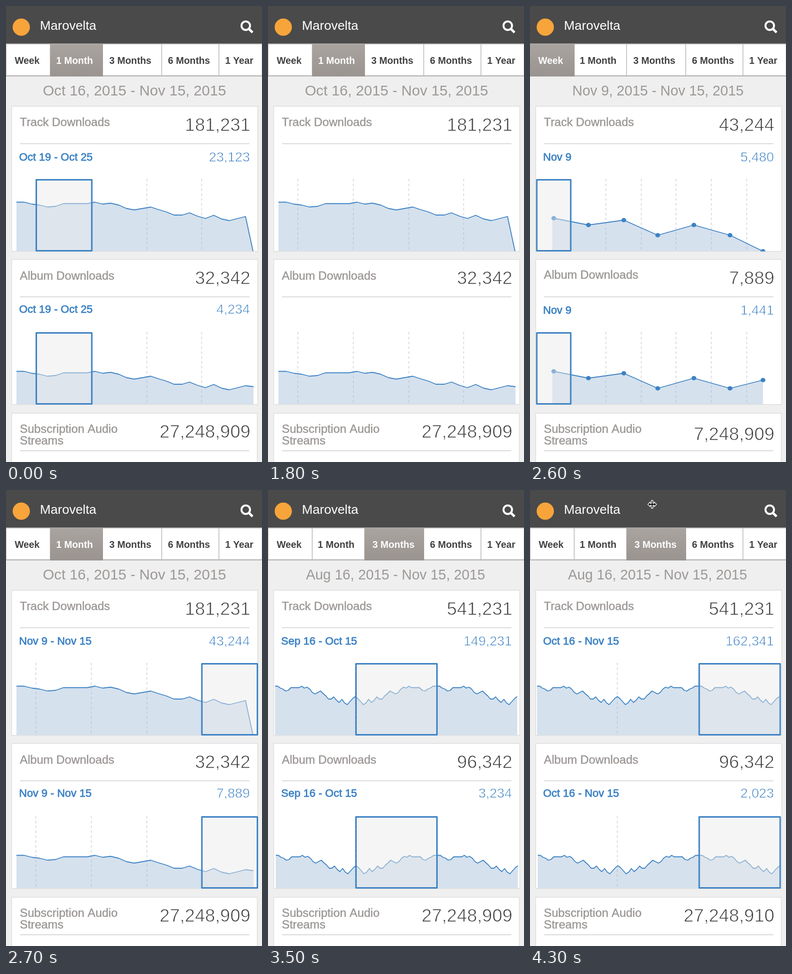
Recreate the animation shown at these times as an HTML page with a canvas. Size 528 px wide and 938 px high, loop 4400 ms.

```html
<!DOCTYPE html>
<html lang="en">
<head>
<meta charset="utf-8">
<title>Download trends</title>
<style>
html, body { margin: 0; width: 100%; height: 100%; overflow: hidden; background: #efefef; }
canvas { display: block; width: 528px; height: 938px; }
</style>
</head>
<body>
<canvas id="stage"></canvas>
<script>
const W = 528, H = 938, LOOP = 4400;
const BLUE = '#3d82c4', GRAY = '#9c9896', DARK = '#3e3e40';
const SANS = '"Liberation Sans", Arial, sans-serif';

const canvas = document.getElementById('stage');
const ctx = canvas.getContext('2d');
const ratio = window.devicePixelRatio || 1;
canvas.width = W * ratio;
canvas.height = H * ratio;

// Tab label, left edge, right edge, text x, text x when active
const TABS = [
  ['Week', 0, 91, 18, 17],
  ['1 Month', 91, 199, 102.5, 103.5],
  ['3 Months', 199, 321, 213, 215.5],
  ['6 Months', 321, 439, 334, 334],
  ['1 Year', 439, 528, 452, 452]
];

const trend = [
  [21, 403], [37, 403], [53, 407], [69, 409], [85, 413], [102, 411.5], [118, 406],
  [167, 406], [183, 403], [199, 407], [215, 405], [232, 409], [248, 416], [264, 419],
  [298, 413], [313, 418], [330, 423], [346, 429.5], [363, 429.5], [378, 425],
  [395, 432], [411, 436.5], [428, 430], [444, 437.5], [460, 441]
];
const shift = (pts, dx, dy) => pts.map(([x, y]) => [x + dx, y + dy]);

// A quarter is the monthly trend squeezed, mirrored and repeated
const third = trend.map(([x, y]) => [14 + (x - 21) * 0.339, y]);
third.push([174.5, 428], [179.5, 424.5]);
const mirror = third.map(([x, y]) => [359 - x, y]).reverse();
const quarter = [...third, ...mirror, ...shift(third, 334, 0)];

const week = [[48.5, 436], [120, 450], [193, 440], [263, 471], [337.5, 450], [412, 471]];

const RANGES = {
  week: {
    tab: 0, dates: 'Nov 9, 2015 - Nov 15, 2015', size: 28.9, mid: 264,
    totals: ['43,244', '7,889'], streams: '7,248,909', streamsY: 893,
    titleY: 561, subY: 633, dots: true, left: 46,
    lines: [84.5, 156.5, 229.5, 301, 374, 447],
    charts: [[...week, [480, 504]], [...shift(week, 0, 315), [480, 769]]]
  },
  month: {
    tab: 1, dates: 'Oct 16, 2015 - Nov 15, 2015', size: 30.1, mid: 265,
    totals: ['181,231', '32,342'], streams: '27,248,909', streamsY: 888,
    titleY: 563, subY: 631,
    lines: [61.5, 176, 290.5, 403.5],
    charts: [
      [...trend, [493.5, 432.5], [509, 504]],
      [...shift(trend, 0, 348), [493.5, 780.5], [510, 782.5]]
    ]
  },
  quarter: {
    tab: 2, dates: 'Aug 16, 2015 - Nov 15, 2015', size: 28.9, mid: 263,
    totals: ['541,231', '96,342'], streams: '27,248,909', streamsY: 888,
    titleY: 563, subY: 631, lines: [180, 348],
    charts: [quarter, shift(quarter, 1.5, 348)]
  }
};

const STATES = [
  { at: 0, range: 'month', label: 'Oct 19 - Oct 25', subs: ['23,123', '4,234'], box: [61, 178.5] },
  { at: 1500, range: 'month' },
  { at: 2100, range: 'week', label: 'Nov 9', subs: ['5,480', '1,441'], box: [12.5, 85.5] },
  { at: 2700, range: 'month', label: 'Nov 9 - Nov 15', subs: ['43,244', '7,889'], box: [402.5, 520] },
  { at: 3300, range: 'quarter', label: 'Sep 16 - Oct 15', subs: ['149,231', '3,234'], box: [180, 350] },
  { at: 3900, range: 'quarter', label: 'Oct 16 - Nov 15', subs: ['162,341', '2,023'], box: [347.5, 517.5],
    streams: '27,248,910' }
];
const CURSOR_AT = 4200;

function rect(x, y, w, h, color) {
  ctx.fillStyle = color;
  ctx.fillRect(x, y, w, h);
}

// A stroke in the text colour thickens the letters, a white one thins them
function text(str, x, y, font, color, align = 'left', weight = 0, edge = color) {
  ctx.font = font + ' ' + SANS;
  ctx.textAlign = align;
  ctx.fillStyle = color;
  ctx.fillText(str, x, y);
  if (weight) {
    ctx.strokeStyle = edge;
    ctx.lineWidth = weight;
    ctx.strokeText(str, x, y);
  }
}

const heading = (str, y) => text(str, 28.5, y, '24.2px', GRAY, 'left', 0.5);
const total = (str, y) => text(str, 504, y, '37.4px', DARK, 'right', 1, '#fff');

function path(pts) {
  ctx.beginPath();
  pts.forEach(([x, y]) => ctx.lineTo(x, y));
}

function header() {
  rect(0, 0, W, 77.5, '#4a4a4a');
  ctx.fillStyle = '#f7a43b';
  ctx.beginPath();
  ctx.arc(31.5, 43.5, 17.8, 0, 7);
  ctx.fill();
  text('Marovelta', 70, 49, '26.5px', '#fff');
  ctx.strokeStyle = '#fff';
  ctx.lineWidth = 4;
  ctx.beginPath();
  ctx.arc(494.5, 40.5, 8.8, 0, 7);
  ctx.stroke();
  ctx.lineWidth = 5;
  ctx.beginPath();
  ctx.moveTo(501, 47);
  ctx.lineTo(508.5, 54.5);
  ctx.stroke();
}

function tabs(active) {
  rect(0, 77.5, W, 67.5, '#bbb8b7');
  TABS.forEach(([label, x0, x1, tx, activeX], i) => {
    const on = i === active;
    if (on) {
      const g = ctx.createLinearGradient(0, 78, 0, 144);
      g.addColorStop(0, '#aaa4a1');
      g.addColorStop(1, '#9a9490');
      rect(x0, 78, x1 - x0 + 1, 67, g);
    } else {
      rect(x0 + 1, 79, x1 - x0 - 1.5, 63.5, '#fff');
    }
    text(label, on ? activeX : tx, 118.5, 'bold 19.8px', on ? '#fff' : '#414143');
  });
}

function card(y, h, right) {
  rect(11, y, right - 11, h, '#dedede');
  rect(12.5, y + 1.5, right - 14, h - 3, '#fff');
  rect(29, y + 77, 473, 1.6, '#d2d2d2');
}

function chart(range, data, top, base, box) {
  const pts = shift(data, 0.5, 0.5);
  const left = range.left || pts[0][0];
  const right = pts[pts.length - 1][0];
  path([[left, base], [left, pts[0][1]], ...pts, [right, base]]);
  ctx.fillStyle = '#d5e1ed';
  ctx.fill();

  ctx.strokeStyle = 'rgba(176,184,206,0.6)';
  ctx.lineWidth = 1.6;
  ctx.setLineDash([5, 5]);
  range.lines.forEach(x => {
    path([[x, top], [x, base]]);
    ctx.stroke();
  });
  ctx.setLineDash([]);

  path(pts);
  ctx.strokeStyle = BLUE;
  ctx.lineWidth = 1.8;
  ctx.stroke();
  if (range.dots) {
    ctx.fillStyle = BLUE;
    pts.forEach(([x, y]) => {
      ctx.beginPath();
      ctx.ellipse(x, y, 5, 4.4, 0, 0, 7);
      ctx.fill();
    });
  }
  // Keeps the lowest dot inside its card
  rect(13, base, 505, 1, '#dedede');
  rect(13, base + 1, 505, 8, '#efefef');

  if (box) {
    const [x0, x1] = box;
    rect(x0, top, x1 - x0, base - top, 'rgba(233,233,233,0.45)');
    ctx.strokeStyle = BLUE;
    ctx.lineWidth = 3;
    ctx.strokeRect(x0 + 1.5, top + 2, x1 - x0 - 3, base - top - 3);
  }
}

function subtotal(state, i, y) {
  if (!state.label) return;
  text(state.label, 27, y, '22.4px', BLUE, 'left', 0.8);
  text(state.subs[i], 503, y + 2, '27.6px', BLUE, 'right', 0.8, '#fff');
}

function cursor(x, y) {
  const half = [[1.5, -8], [1.5, -2], [4, -2], [4, -5], [9, 0], [4, 5], [4, 2], [1.5, 2], [1.5, 8]];
  const shape = [...half, ...half.map(([a, b]) => [-a, b]).reverse()];
  path(shift(shape, x, y));
  ctx.closePath();
  ctx.fillStyle = '#111';
  ctx.fill();
  ctx.strokeStyle = '#fff';
  ctx.lineWidth = 1.3;
  ctx.stroke();
}

function draw(t) {
  const state = STATES.filter(s => s.at <= t).pop();
  const range = RANGES[state.range];
  ctx.setTransform(ratio, 0, 0, ratio, 0, 0);
  ctx.lineJoin = 'round';
  rect(0, 0, W, H, '#efefef');
  header();
  tabs(range.tab);
  text(range.dates, range.mid, 183.5, range.size + 'px', GRAY, 'center');

  card(205.5, 300, 520);
  heading('Track Downloads', 246.5);
  total(range.totals[0], 257);
  subtotal(state, 0, 318);
  chart(range, range.charts[0], 355.5, 504.5, state.box);

  card(520.5, 300, 520);
  heading('Album Downloads', range.titleY);
  total(range.totals[1], 572);
  subtotal(state, 1, range.subY);
  chart(range, range.charts[1], 670.5, 819.5, state.box);

  card(837, 110, 519);
  heading('Subscription Audio', 878);
  heading('Streams', 901.5);
  total(state.streams || range.streams, range.streamsY);

  if (t >= CURSOR_AT) cursor(252, 29.5);
}

const start = performance.now();
function tick() {
  draw((performance.now() - start) % LOOP);
  requestAnimationFrame(tick);
}
tick();
</script>
</body>
</html>
```
